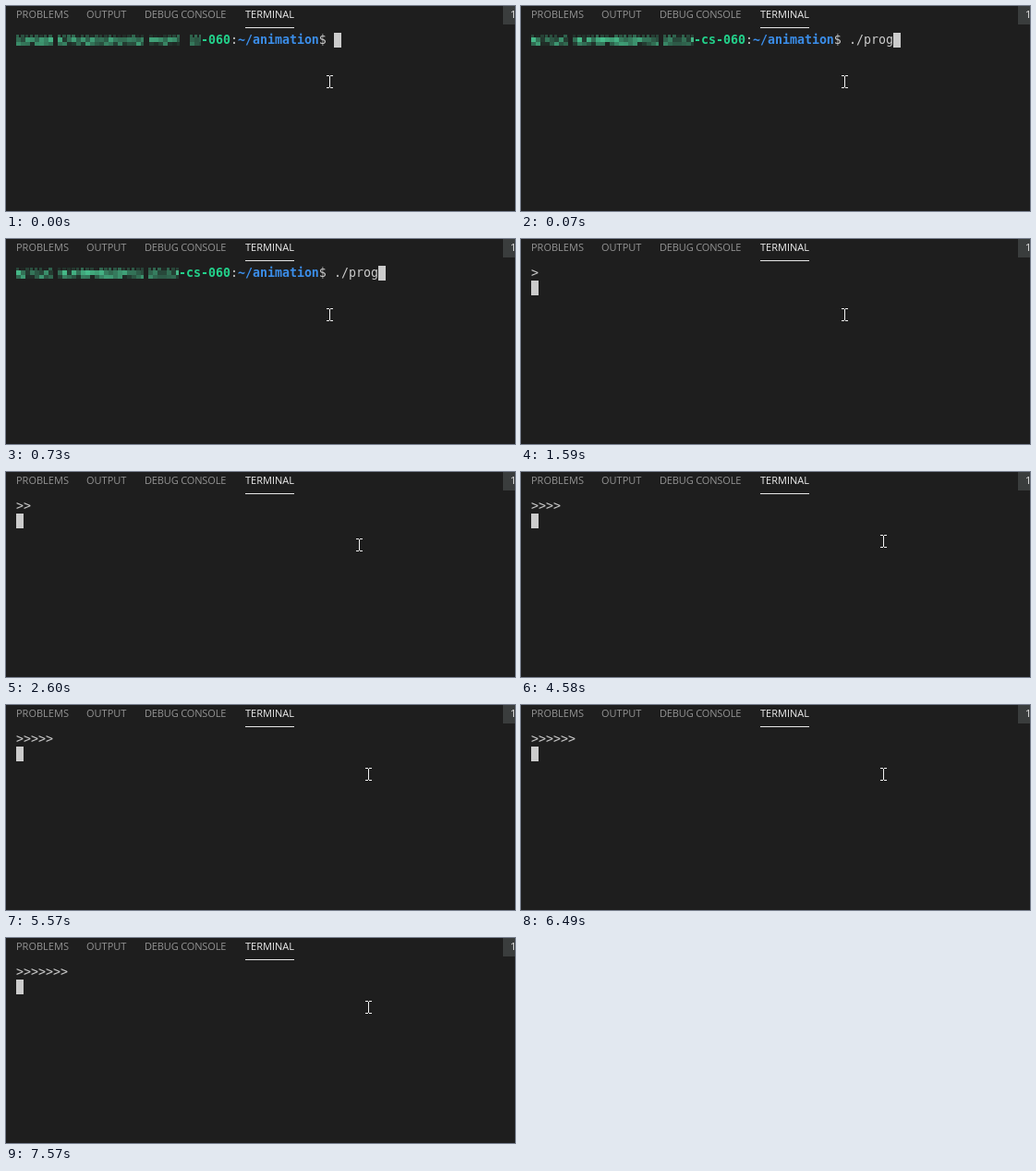
Recreate the animation shown at these times as an HTML page. Size 551 by 222 pixels, loop 8 s.

```html
<!DOCTYPE html>
<html lang="en">
<head>
<meta charset="utf-8">
<title>Terminal</title>
<style>
html, body { margin: 0; width: 100%; height: 100%; overflow: hidden; background: #1e1e1e; }
svg { display: block; width: 551px; height: 222px; }
text { white-space: pre; }
.tabs { font: 11px "Open Sans", "Noto Sans", sans-serif; fill: #939393; }
.tabs .on { fill: #ececec; }
.term { font: 13.288px "DejaVu Sans Mono", monospace; fill: #ccc; }
.host { font-weight: bold; fill: #23d18b; }
.path { font-weight: bold; fill: #3b8eea; }
.block { fill: #ccc; }

.shell, .idle, .recall, .run, .block, .cover, .mouse { animation: 8s step-end infinite; }
.shell { animation-name: shell; }
.idle { animation-name: idle; }
.recall { animation-name: recall; }
.run { animation-name: run; }
.block { animation-name: block; }
.cover { fill: #1e1e1e; animation-name: cover; }
.mouse { animation-name: mouse; }

@keyframes shell { 0% { visibility: visible } 19.875%, 100% { visibility: hidden } }
@keyframes idle { 0% { visibility: visible } .875%, 100% { visibility: hidden } }
@keyframes recall { 0% { visibility: hidden } .875% { visibility: visible } 19.875%, 100% { visibility: hidden } }
@keyframes run { 0% { visibility: hidden } 19.875%, 100% { visibility: visible } }
@keyframes block {
  0% { transform: translate(355px, 29px) }
  .875% { transform: translate(403px, 29px) }
  19.875%, 100% { transform: translate(11px, 45px) }
}
@keyframes cover {
  0% { transform: translateX(19px) }
  32.5% { transform: translateX(27px) }
  44.875% { transform: translateX(35px) }
  57.25% { transform: translateX(43px) }
  69.625% { transform: translateX(51px) }
  81.125% { transform: translateX(59px) }
  94.625%, 100% { transform: translateX(67px) }
}
@keyframes mouse {
  0% { transform: translate(350px, 82px) }
  32.5% { transform: translate(382px, 79px) }
  33.375% { transform: translate(390px, 76px) }
  35%, 100% { transform: translate(392px, 75px) }
}
</style>
</head>
<body>
<svg viewBox="0 0 551 222">
  <g class="tabs">
    <text x="11" y="13">PROBLEMS</text>
    <text x="87" y="13">OUTPUT</text>
    <text x="150" y="13" letter-spacing="-.15">DEBUG CONSOLE</text>
    <text x="259" y="13" class="on">TERMINAL</text>
    <path d="M259 23h53v1h-53z" fill="#e7e7e7"/>
    <path d="M538 0h13v20h-13z" fill="#3a3d3d"/>
    <text x="546" y="13" class="on">1</text>
  </g>

  <g class="term">
    <g class="run">
      <text x="11" y="41">&gt;&gt;&gt;&gt;&gt;&gt;&gt;</text>
      <rect class="cover" y="30" width="60" height="14"/>
    </g>
    <text class="shell" x="243" y="41">:<tspan class="path">~/animation</tspan>$</text>
    <g class="idle">
      <g id="maskA"></g>
      <text class="host" x="211" y="41">-060</text>
    </g>
    <g class="recall">
      <g id="maskB"></g>
      <text class="host" x="187" y="41">-cs-060</text>
      <text x="355" y="41">./prog</text>
    </g>
    <rect class="block" width="8" height="16"/>
  </g>

  <g class="mouse" shape-rendering="crispEdges">
    <path d="M-3-7h3v1h1v-1h3v1h-3v12h3v1h-3v-1h-1v1h-3v-1h3v-12h-3z" fill="#f2f2f2"/>
  </g>
</svg>
<script>
function random(seed) {
  return () => (seed = seed * 16807 % 2147483647) / 2147483647;
}

// Pixelated stand-in for the hidden user name: [start, end] of each word.
function mosaic(id, seed, words) {
  const rnd = random(seed), group = document.getElementById(id);
  const cell = (x, y, w, h, level) => {
    const r = document.createElementNS("http://www.w3.org/2000/svg", "rect");
    const mix = (a, b) => Math.round(a + (b - a) * level);
    const attrs = { x, y, width: w, height: h, "shape-rendering": "crispEdges",
      fill: `rgb(${mix(30, 75)},${mix(34, 205)},${mix(32, 150)})` };
    for (const key in attrs) r.setAttribute(key, attrs[key]);
    group.append(r);
  };
  for (const [start, end] of words) {
    for (let x = start; x < end; x += 5) {
      const w = Math.min(5, end - x);
      cell(x, 31, Math.min(w, 3 + rnd() * 2 | 0), 3, rnd() * .42);
      cell(x, 34, w, 5, .12 + rnd() * .8);
      cell(x, 39, w, 4, rnd() * .72);
    }
  }
}

mosaic("maskA", 4127, [[11, 51], [56, 149], [155, 188], [199, 211]]);
mosaic("maskB", 9043, [[11, 51], [56, 149], [154, 187]]);
</script>
</body>
</html>
```
